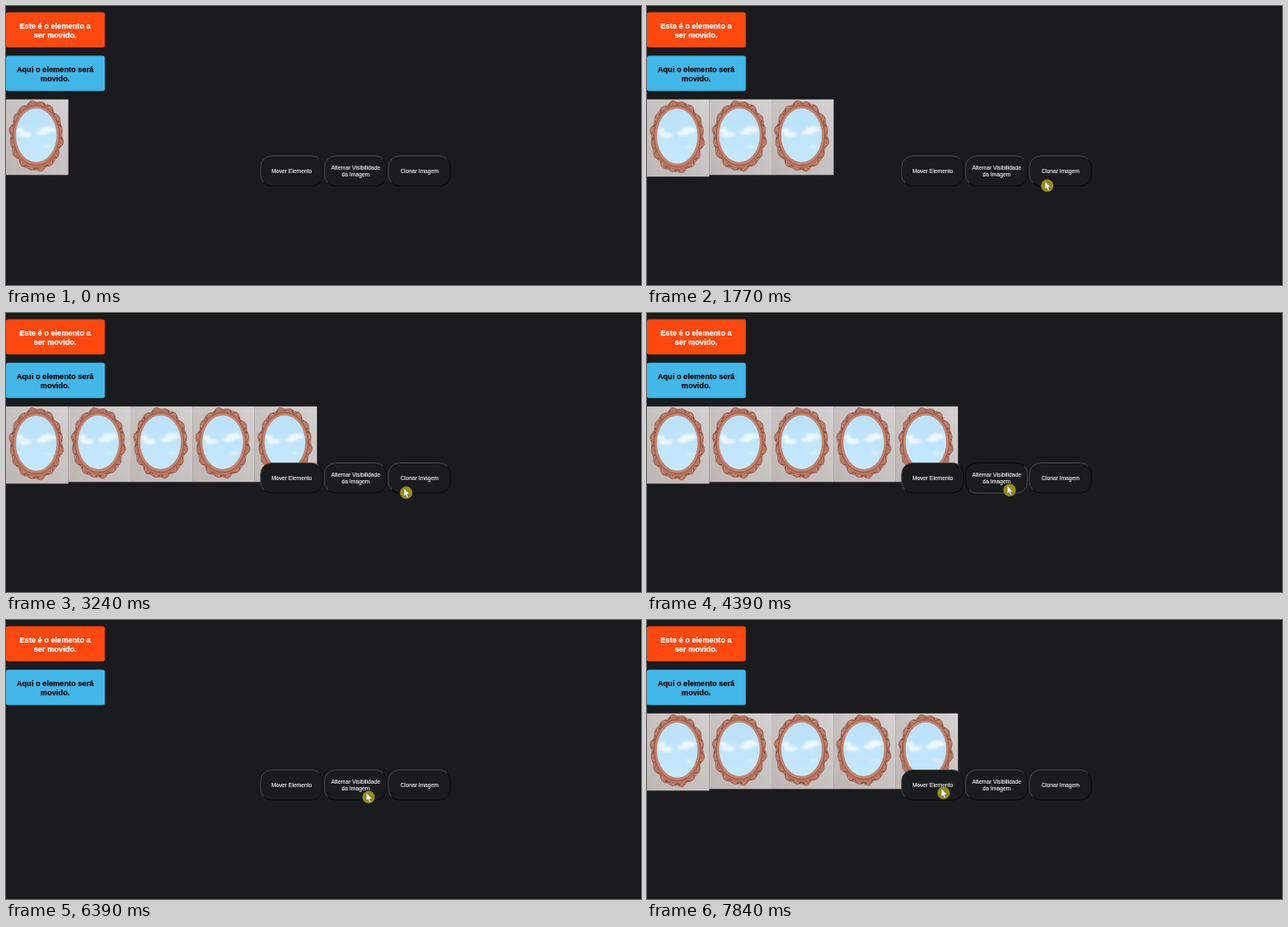
Animation of 760 by 334 pixels, one loop 8 s. Source, as an HTML page:

```html
<!DOCTYPE html>
<html lang="pt">
<head>
<meta charset="utf-8">
<title>Mover, alternar e clonar</title>
<style>
  html, body { margin: 0; width: 100%; height: 100%; overflow: hidden; background: #1a1b1d; }
  svg { display: block; width: 100vw; height: 100vh; }
  text { font-family: "Liberation Sans", Arial, sans-serif; text-anchor: middle; }
  .box text { font-size: 9.12px; font-weight: bold; stroke-width: .25px; }
  .button text { font-size: 6.66px; fill: #fff; stroke: #fff; stroke-width: .1px; }
</style>
</head>
<body>
<svg viewBox="0 0 760 334">
  <defs>
    <linearGradient id="wall" x1="0" y1="1" x2="1" y2="0">
      <stop offset="0" stop-color="#bdb7b3"/>
      <stop offset=".5" stop-color="#c6c3c1"/>
      <stop offset="1" stop-color="#d3d2d2"/>
    </linearGradient>
    <linearGradient id="sky" x1="0" y1="0" x2="0" y2="1">
      <stop offset="0" stop-color="#b9e1f9"/>
      <stop offset="1" stop-color="#c5e9fd"/>
    </linearGradient>
    <clipPath id="glass"><ellipse cx="36.2" cy="43" rx="24.4" ry="32.2"/></clipPath>
    <filter id="soft"><feGaussianBlur stdDeviation="1.6"/></filter>
    <g id="mirror">
      <rect width="74.6" height="90.5" fill="url(#wall)"/>
      <g id="frame"></g>
      <g clip-path="url(#glass)">
        <rect x="10" y="9" width="53" height="68" fill="url(#sky)"/>
        <g fill="#eef8fe" filter="url(#soft)">
          <ellipse cx="50" cy="36" rx="9" ry="3.6"/>
          <ellipse cx="43" cy="40" rx="7" ry="2.6"/>
          <ellipse cx="23" cy="42" rx="8" ry="3"/>
          <ellipse cx="17" cy="37" rx="4" ry="3"/>
          <ellipse cx="50" cy="56" rx="5" ry="1.6" opacity=".6"/>
        </g>
      </g>
    </g>
  </defs>
  <rect width="760" height="334" fill="#1a1b1d"/>
  <path d="M0 .5H759.5V334" fill="none" stroke="#121314"/>
  <g id="stage"></g>
  <g id="cursor">
    <circle r="7.5" fill="#978a16"/>
    <path d="M-2.8 -5.2V4.6L-.6 2.6L1 6.3L2.7 5.6L1.1 2L4 1.8Z" fill="#fff" stroke="#4a4410" stroke-width=".4"/>
  </g>
</svg>
<script>
const LOOP = 8000;
const TILE = 74.4;
const LIGHT = "#494b4d", DARK = "#090a0a";
const $ = id => document.getElementById(id);

function add(parent, name, attrs, content) {
  const el = document.createElementNS("http://www.w3.org/2000/svg", name);
  for (const key in attrs) el.setAttribute(key, attrs[key]);
  if (content) el.textContent = content;
  parent.appendChild(el);
  return el;
}

// Carved frame around the oval glass; inset runs inwards from the outer edge
function rim(angle, inset) {
  const x = 36.3 + (33 - inset) * Math.sin(angle);
  const y = 43.8 - (43 - inset) * Math.cos(angle);
  return `${x.toFixed(2)} ${y.toFixed(2)}`;
}
function outline() {
  const points = Array.from({ length: 200 }, (_, i) => {
    const a = i / 200 * Math.PI * 2;
    return rim(a, 1.6 + 0.9 * Math.cos(a * 16) + 0.7 * Math.sin(a * 10));
  });
  add($("frame"), "path", {
    d: `M${points.join("L")}Z`, fill: "#b97560", stroke: "#8f5d4e", "stroke-width": 0.8
  });
}
function carve(count, outer, inner, twist, stroke, width) {
  let d = "";
  for (let i = 0; i < count; i++) {
    const a = (i + 0.5) / count * Math.PI * 2;
    d += `M${rim(a, outer)}L${rim(a + twist * (i % 2 ? 1 : -1), inner)}`;
  }
  add($("frame"), "path", { d, fill: "none", stroke, "stroke-width": width, "stroke-linecap": "round" });
}
function groove(rx, ry, stroke, width) {
  add($("frame"), "ellipse", { cx: 36.2, cy: 43.2, rx, ry, fill: "none", stroke, "stroke-width": width });
}
outline();
carve(32, 2.4, 4.6, 0.07, "#7f4c3e", 1.1);
carve(26, 2, 3.6, 0.08, "#d59b87", 0.8);
groove(27.6, 35.8, "#945a49", 0.9);
groove(25.7, 33.6, "#c58570", 2.2);

function box(y, fill, color, lines) {
  const g = add($("stage"), "g", { class: "box" });
  add(g, "rect", { x: 0, y, width: 118.3, height: 42.2, rx: 2.5, fill });
  lines.forEach((line, i) =>
    add(g, "text", { x: 58.8, y: y + 19.3 + i * 11, fill: color, stroke: color }, line));
}
box(7.4, "#ff480e", "#fff", ["Este é o elemento a", "ser movido."]);
box(59.5, "#41b7ea", "#0b0c0d", ["Aqui o elemento será", "movido."]);

const mirrors = Array.from({ length: 5 }, () => add($("stage"), "use", { href: "#mirror" }));

function button(x, lines) {
  const w = 74, h = 36, r = 13, k = r * 0.293;
  const arc = (px, py) => `A${r} ${r} 0 0 1 ${px} ${py}`;
  const g = add($("stage"), "g", { class: "button", transform: `translate(${x} 179.5)` });
  add(g, "rect", { width: w, height: h, rx: r, fill: "#1a1b1d" });
  const upper = add(g, "path", {
    d: `M${k} ${h - k}${arc(0, h - r)}V${r}${arc(r, 0)}H${w - r}${arc(w - k, k)}`, fill: "none"
  });
  const lower = add(g, "path", {
    d: `M${w - k} ${k}${arc(w, r)}V${h - r}${arc(w - r, h)}H${r}${arc(k, h - k)}`, fill: "none"
  });
  lines.forEach((line, i) =>
    add(g, "text", { x: w / 2 + 0.2, y: 20.2 + (i - (lines.length - 1) / 2) * 7.8 }, line));
  return pressed => {
    upper.setAttribute("stroke", pressed ? DARK : LIGHT);
    lower.setAttribute("stroke", pressed ? LIGHT : DARK);
  };
}
const moveButton = button(304.8, ["Mover Elemento"]);
const toggleButton = button(381.3, ["Alternar Visibilidade", "da Imagem"]);
const cloneButton = button(457.8, ["Clonar Imagem"]);

// Mouse down and up times
const cloneClicks = [[1000, 1110], [1550, 1660], [2250, 2360], [3040, 3140]];
const toggleClicks = [[4390, 4600], [5480, 5590], [6280, 6390], [6970, 7080]];
const done = (clicks, t) => clicks.filter(c => t >= c[1]).length;
const held = (clicks, t) => clicks.some(c => t >= c[0] && t < c[1]);

// Pointer moves: start, end, from, to
const moves = [
  [200, 900, [462, 305], [479, 215]],
  [3830, 4390, [479, 215], [434, 212]],
  [7080, 7640, [434, 212], [355, 207]]
];
function pointer(t) {
  const [start, end, from, to] = moves.filter(m => t >= m[0]).pop() || moves[0];
  const p = Math.min(1, Math.max(0, (t - start) / (end - start)));
  const e = p * p * (3 - 2 * p);
  return from.map((v, i) => v + (to[i] - v) * e);
}

moveButton(false);

function draw(t) {
  const count = 1 + done(cloneClicks, t);
  const shown = done(toggleClicks, t) % 2 === 0;
  mirrors.forEach((m, i) => {
    const stretch = i === 0 && count > 1 ? 1.022 : 1;
    m.setAttribute("transform", `translate(${i * TILE} 111.8) scale(1 ${stretch})`);
    m.setAttribute("visibility", shown && i < count ? "visible" : "hidden");
  });
  toggleButton(held(toggleClicks, t));
  cloneButton(held(cloneClicks, t));
  $("cursor").setAttribute("transform", `translate(${pointer(t).join(" ")})`);
  $("cursor").setAttribute("visibility", t < moves[0][0] ? "hidden" : "visible");
}

const begin = performance.now();
function tick() {
  draw((performance.now() - begin) % LOOP);
  requestAnimationFrame(tick);
}
tick();
</script>
</body>
</html>
```
